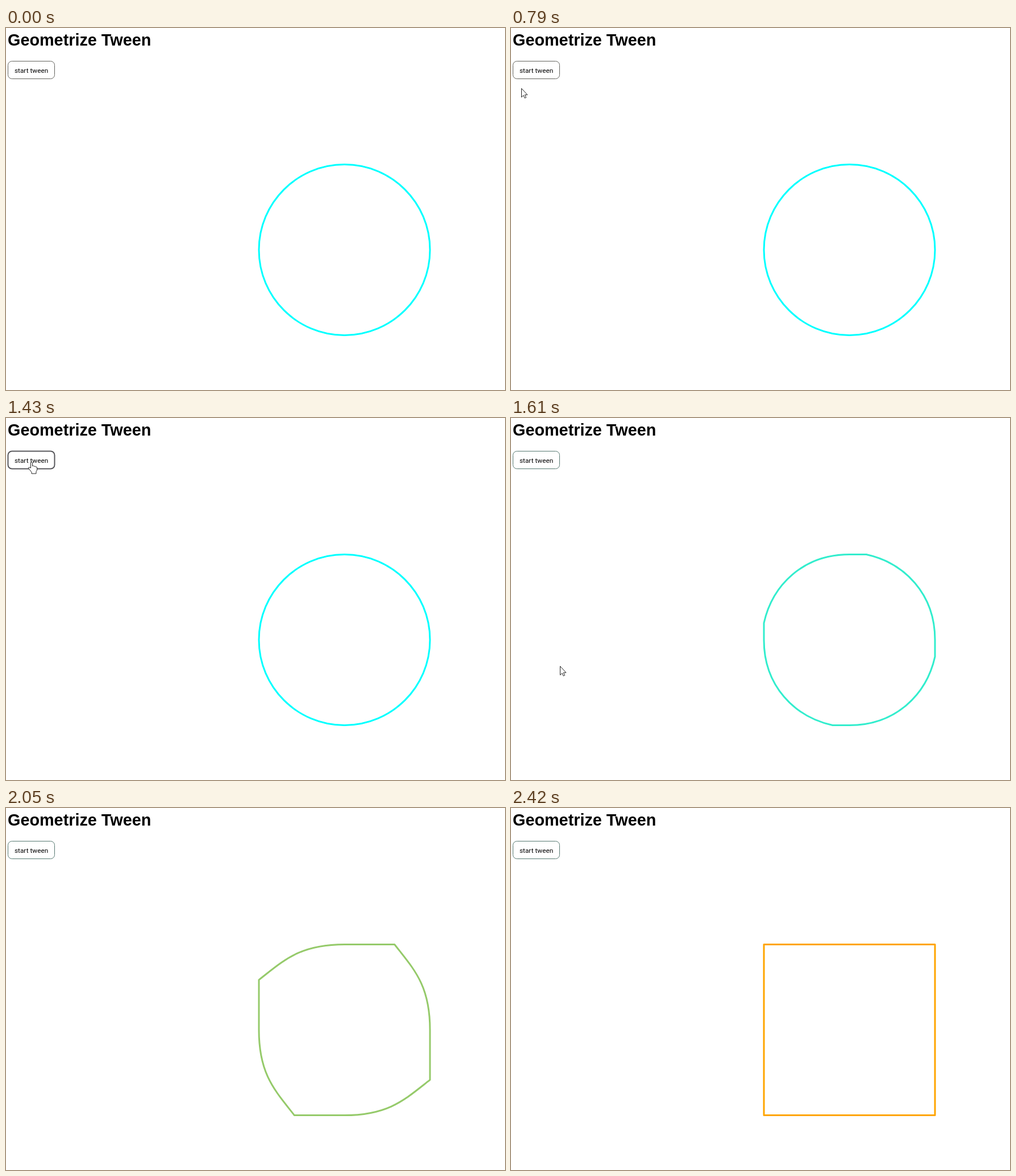
These frames come from a looping animation (878 by 638 pixels, 3.64 s). An HTML page:

```html
<!DOCTYPE html>
<html lang="en">
<head>
<meta charset="utf-8">
<title>Geometrize Tween</title>
<style>
  html, body { margin: 0; width: 100%; height: 100%; overflow: hidden; background: #fff; }
  svg { display: block; width: 878px; height: 638px; }
  .title { font: bold 28.8px "Liberation Sans", Arial, sans-serif; }
  .label { font: 11.8px Roboto, Tahoma, sans-serif; }
  #button { fill: #fff; stroke: #62625c; stroke-width: 1; }
  #button.hover { stroke: #58585c; stroke-width: 2; }
  #button.done { stroke: #557870; }
  #shape { fill: none; stroke-width: 3; stroke-linejoin: round; }
  #pointer path { fill: #fff; stroke: #222; stroke-linejoin: round; }
</style>
</head>
<body>
<svg viewBox="0 0 878 638">
  <text class="title" x="3" y="31">Geometrize Tween</text>
  <rect id="button" x="3.5" y="58.5" width="82" height="31" rx="7"/>
  <text class="label" x="15" y="78.5">start tween</text>
  <path id="shape"/>
  <g id="pointer">
    <path id="arrow" d="M.5 .5V16L4 12.7 6.2 17.6 8.6 16.5 6.4 11.8H11Z"/>
    <path id="hand" d="M-1.5 11V2a1.5 1.5 0 0 1 3 0V7.5q2.2-1 3 .7 2.2-.8 2.8.9 2.4-.4 2.4 1.8v4L8 17.5V21H0v-2.5L-5.5 11.5q0-2 2-1.500Z"/>
  </g>
</svg>
<script>
const LOOP = 3640;
const STEP = 56, PHASE = 42;   // the picture refreshes on this beat
const ENTER = { start: 490, end: 1050 };
const HOVER = { start: 1050, end: 1610 };
const PRESS = { start: 1050, end: 1498 };
const LEAVE = { start: 1498, end: 1666 };
const TWEEN = { start: 1411, end: 2420 };

const cx = 595.5, cy = 391, r = 150.5, k = 0.5523;
const cyan = [0, 255, 255], orange = [255, 165, 0];
const [button, shape, pointer, arrow, hand] =
  ["button", "shape", "pointer", "arrow", "hand"].map(id => document.getElementById(id));

const mix = (a, b, p) => a + (b - a) * p;
const within = (t, span) => t >= span.start && t < span.end;
const progress = (t, span) => (t - span.start) / (span.end - span.start);
const show = (node, on) => node.setAttribute("visibility", on ? "visible" : "hidden");

// Point on the unit outline after a number of quarter turns
function point(x, y, turns) {
  for (let i = 0; i < turns; i++) [x, y] = [-y, x];
  return `${(cx + r * x).toFixed(2)} ${(cy + r * y).toFixed(2)}`;
}

// Each quarter arc straightens into half a side, both handles meeting at its middle
function outline(p) {
  let d = "";
  for (let q = 0; q < 4; q++) {
    d += (q ? "L" : "M") + point(p, -1, q) +
      "C" + point(mix(k, 1, p), mix(-1, -0.5, p), q) +
      " " + point(1, mix(-k, -0.5, p), q) +
      " " + point(1, 0, q);
  }
  return d + "Z";
}

// Sweeps in along the left edge, rests on the button, then drops away
function position(t) {
  if (within(t, ENTER)) {
    const u = progress(t, ENTER);
    return [56 * u - 10 + 76 * (1 - u) ** 24, 88 + 323 * (1 - u) ** 4.2];
  }
  if (within(t, PRESS)) return [45, 77];
  if (t >= LEAVE.start && t < LEAVE.end + STEP) {
    const u = Math.min(1, progress(t, LEAVE));
    return [mix(40, 118, u ** 1.3), mix(541, 92, (1 - u) ** 1.33)];
  }
  return null;
}

function draw(t) {
  const p = Math.min(1, Math.max(0, progress(t, TWEEN)));
  shape.setAttribute("d", outline(p));
  shape.setAttribute("stroke", `rgb(${cyan.map((c, i) => Math.round(mix(c, orange[i], p)))})`);

  button.setAttribute("class", within(t, HOVER) ? "hover" : t >= HOVER.end ? "done" : "");

  const at = position(t);
  const pressing = within(t, PRESS);
  show(arrow, at && !pressing);
  show(hand, at && pressing);
  if (at) pointer.setAttribute("transform", `translate(${at.map(Math.round)})`);
}

function frame() {
  const now = performance.now() % LOOP;
  const beat = PHASE + STEP * Math.floor((now - PHASE) / STEP);
  draw(now < TWEEN.end ? beat : now);
  requestAnimationFrame(frame);
}
frame();
</script>
</body>
</html>
```
